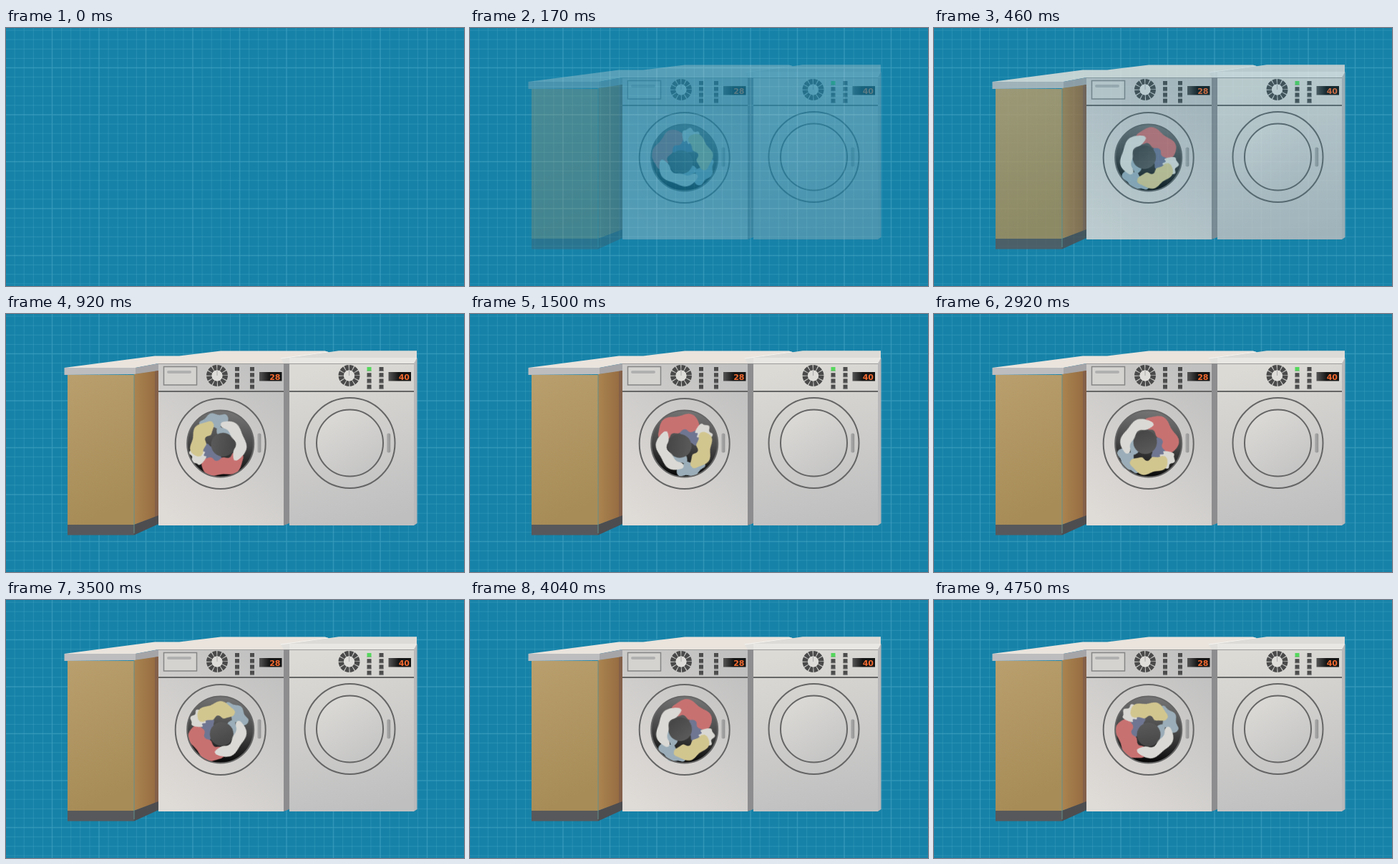
An HTML page that plays this animation: 640x360 px, repeating every 4.79 s.

```html
<!DOCTYPE html>
<html lang="en">
<head>
<meta charset="utf-8">
<title>Laundry room</title>
<style>
  html, body { margin: 0; width: 100%; height: 100%; overflow: hidden; background: #1782a8; }
  svg { display: block; width: 640px; height: 360px; }
  text { font: bold 11px "DejaVu Sans", sans-serif; fill: #f26a30; text-anchor: end; }
  #laundry { transform-origin: 298px 183px; }
</style>
</head>
<body>
<svg viewBox="0 0 640 360">
  <defs>
    <linearGradient id="wood" x2="0.2" y2="1"><stop stop-color="#b99f6d"/><stop offset="1" stop-color="#a78c57"/></linearGradient>
    <linearGradient id="side"><stop stop-color="#aa8450"/><stop offset="1" stop-color="#93693f"/></linearGradient>
    <linearGradient id="washer" x1="0.15" y1="1" x2="0.85" y2="0"><stop stop-color="#dfdbd7"/><stop offset="1" stop-color="#c0c0c0"/></linearGradient>
    <linearGradient id="dryer" x1="0.4" x2="0.6" y2="1"><stop stop-color="#dcdad5"/><stop offset="1" stop-color="#bfbfc0"/></linearGradient>
    <linearGradient id="glass" x1="0.2" x2="0.8" y2="1"><stop stop-color="#dddbd7"/><stop offset="1" stop-color="#c3c3c3"/></linearGradient>
    <linearGradient id="drum" x1="0.6" x2="0.5" y2="1"><stop stop-color="#757575"/><stop offset="0.5" stop-color="#484848"/><stop offset="1" stop-color="#060606"/></linearGradient>
    <linearGradient id="hole" x2="1" y2="1"><stop stop-color="#424242"/><stop offset="1" stop-color="#5e5e5e"/></linearGradient>
    <linearGradient id="screen"><stop stop-color="#555"/><stop offset="0.45" stop-color="#151515"/></linearGradient>
    <linearGradient id="grip"><stop stop-color="#aaa"/><stop offset="1" stop-color="#949494"/></linearGradient>
  </defs>
  <g id="grid" fill="none" stroke="#52aecb"></g>
  <g id="room" opacity="0">
    <path fill="#eae4dd" d="M81.500 75 208 58.500H242L300 51.500H446L452 54 388 69H213L181 75Z"/>
    <path fill="#bdbdbf" d="M81.500 75H181V84L81.500 85Z"/>
    <path fill="#a5a5a8" d="M181 75 213 69V80L181 84Z"/>
    <path fill="url(#wood)" d="M86 85H179V294H86Z"/>
    <path fill="url(#side)" d="M179 84 213 79V282L179 294Z"/>
    <path fill="#84604a" d="M208 80 213 79V282L208 284Z"/>
    <path fill="#57585b" d="M86 294H179V308.500H86Z"/>
    <path fill="#4d4d50" d="M179 294 213 281V293L179 308.500Z"/>
    <path stroke="#64908b" d="M179 84V306"/>

    <path fill="#8d8d8f" d="M388 69 396 66V292L388 295Z"/>
    <path fill="url(#washer)" d="M213 69H388V295H213Z"/>
    <path fill="#e2e0dc" d="M384 62 448 52.500 452 54 396 64V69H388Z"/>
    <path stroke="#f6f4f0" d="M384 62 450 53"/>
    <path fill="#dddbd7" d="M396 61 465 51.300H574V61Z"/>
    <path fill="#e9e7e3" d="M396 61H574V69H396Z"/>
    <path fill="#b8b8b9" d="M570 69 574.500 61V292L570 295Z"/>
    <path fill="url(#dryer)" d="M396 69H570V295H396Z"/>
    <path stroke="#9b9b9b" d="M213 69.500H388M396 69.500H570"/>
    <path stroke="#666" stroke-width="2" d="M213 108H388M396 108H570"/>
    <rect x="220.500" y="73.500" width="46" height="25.500" fill="#d5d3d0" stroke="#858585" stroke-width="1.500"/>
    <path stroke="#b0b0b0" stroke-width="4" stroke-linecap="round" d="M227 81H257"/>
    <g id="controls"></g>
    <g id="doors"></g>
  </g>
</svg>
<script>
const NS = "http://www.w3.org/2000/svg";
const LOOP = 4790, FADE = 560, TURN = 1195;
const HUB = { x: 298, y: 183 };
const byId = id => document.getElementById(id);

function add(parent, tag, attrs, text = "") {
  const el = document.createElementNS(NS, tag);
  for (const key in attrs) el.setAttribute(key, attrs[key]);
  el.textContent = text;
  return parent.appendChild(el);
}

function drawGrid(step, width, opacity) {
  let d = "";
  for (let x = 64.5 % step; x < 640; x += step) d += `M${x} 0V360`;
  for (let y = 55.5 % step; y < 360; y += step) d += `M0 ${y}H640`;
  add(byId("grid"), "path", { d, "stroke-width": width, opacity });
}

function drawControls(x, gap, label, lit) {
  const g = add(byId("controls"), "g", { transform: `translate(${x} 86)` });
  const slice = 2 * Math.PI * 11.2 / 12;
  add(g, "circle", { r: 15, fill: "#c9c9c7" });
  add(g, "circle", { r: 11.2, fill: "none", stroke: "#4a4a4a", "stroke-width": 7.5,
    "stroke-dasharray": `${slice - 1.1} 1.1` });
  add(g, "circle", { r: 7.5, fill: "#deddda" });
  add(g, "path", { d: "M0 -7V0", stroke: "#aaa" });
  for (let i = 0; i < 8; i++) {
    const bx = 25 + (i >> 2) * gap, by = (i % 4) * 8.2 - 12;
    const on = lit && i === 0;
    add(g, "rect", { x: bx, y: by, width: 6, height: 6, fill: on ? "#55d75c" : "#4c4c4c" });
    add(g, "path", { d: `M${bx} ${by + 5.5}h6`, stroke: on ? "#7fae80" : "#777" });
  }
  const sx = 38 + gap;
  add(g, "rect", { x: sx, y: -5, width: 31.5, height: 12.5, fill: "url(#screen)" });
  add(g, "text", { x: sx + 29.5, y: 5.6 }, label);
}

// A rippled band with rounded ends, bent around the hub
function cloth(parent, fill, from, to, inner, outer, phase) {
  const mid = (inner + outer) / 2, half = (outer - inner) / 2;
  const steps = 40, points = [];
  for (let i = 0; i < 2 * steps; i++) {
    const edge = i < steps ? 1 : -1;
    const u = edge * ((i % steps) / steps * 2 - 1);
    const angle = (from + (to - from) * (u + 1) / 2) * Math.PI / 180;
    const ripple = 1 + 0.2 * Math.sin(7 * u + phase + edge);
    const r = mid + edge * half * Math.sqrt(1 - u ** 4) * ripple;
    points.push(`${(HUB.x + r * Math.cos(angle)).toFixed(1)},${(HUB.y + r * Math.sin(angle)).toFixed(1)}`);
  }
  add(parent, "polygon", { fill, points: points.join(" ") });
}

function drawLaundry(parent) {
  const g = add(parent, "g", { id: "laundry" });
  cloth(g, "#6f7691", -65, 45, 10, 28, 0);
  cloth(g, "#9aadb8", 115, 190, 10, 26, 0);
  cloth(g, "#9aadb8", 80, 147, 25, 44, 1);
  cloth(g, "#c87171", -124, -6, 20, 43, 3);
  cloth(g, "#d9d8d3", -10, 29, 24, 43, 2);
  cloth(g, "#d2c68f", 6, 112, 20, 40, 5);
  add(g, "circle", { cx: 293.5, cy: 180.5, r: 16.5, fill: "url(#hole)" });
  cloth(g, "#dad9d5", 130, 262, 22, 37, 4);
}

function drawDoor(x, y, fill, contents) {
  const g = byId("doors");
  const ring = { cx: x, cy: y, fill: "none", stroke: "#656565", "stroke-width": 2 };
  add(g, "circle", { cx: x, cy: y, r: 46.5, fill });
  if (contents) contents(g);
  add(g, "circle", { ...ring, r: 46.5 });
  add(g, "circle", { ...ring, r: 63 });
  add(g, "rect", { x: x + 51.7, y: 166.5, width: 5, height: 27, rx: 2, fill: "url(#grip)" });
}

drawGrid(13.1, 1, 0.3);
drawGrid(65.5, 2, 0.22);
drawControls(295, 21, "28", false);
drawControls(479.5, 17, "40", true);
drawDoor(299.7, 181, "url(#drum)", drawLaundry);
drawDoor(480.5, 180, "url(#glass)");

const play = (id, frames) => byId(id).animate(frames, { duration: LOOP, iterations: Infinity });
const spin = deg => ({ transform: `rotate(${deg}deg)` });
const start = -134;

play("laundry", [spin(start), spin(start + 360 * LOOP / TURN)]);
play("room", [{ opacity: 0 }, { opacity: 1, offset: FADE / LOOP }, { opacity: 1 }]);
</script>
</body>
</html>
```
